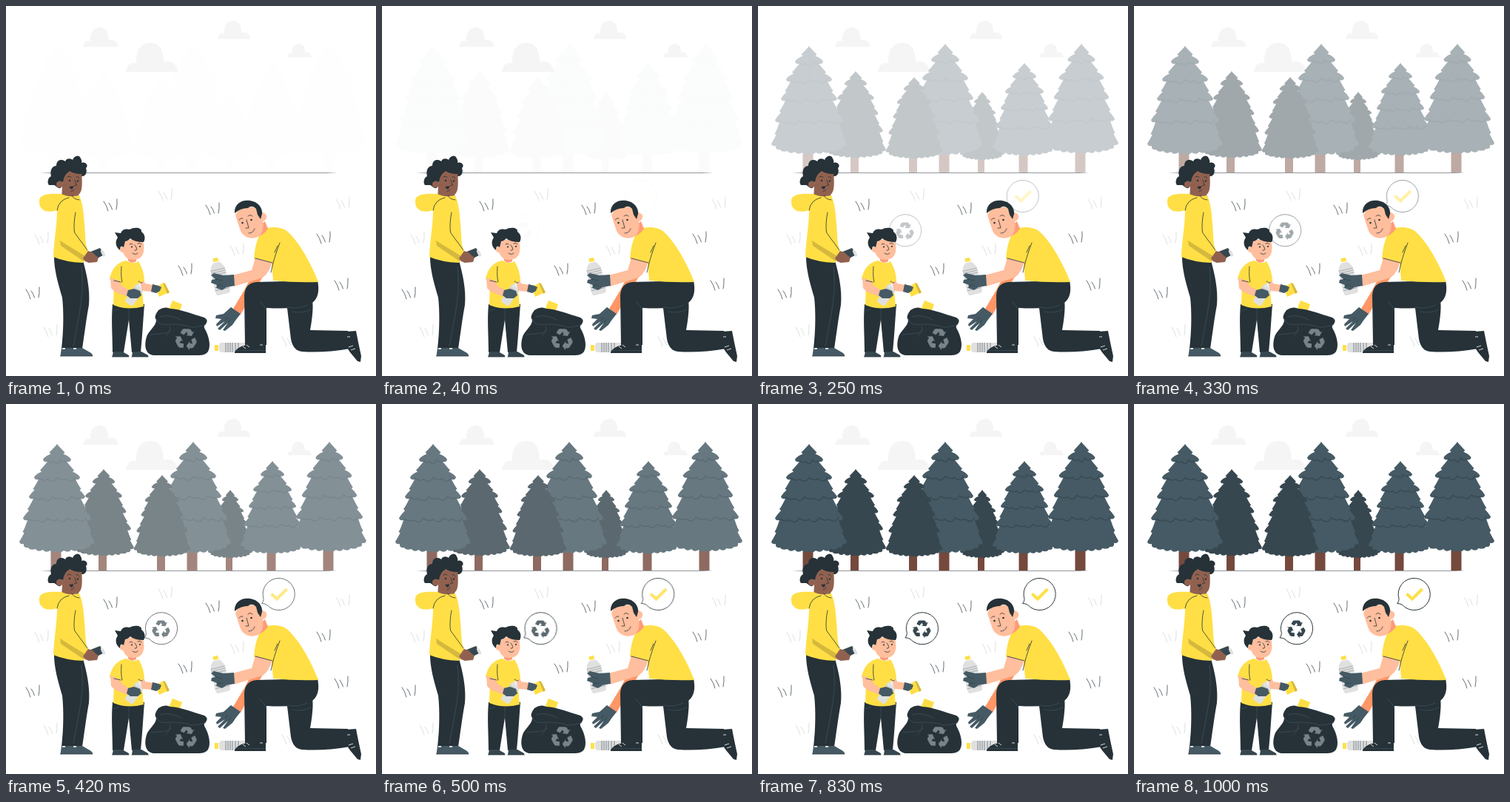
An HTML page for the animation above (1.04 s loop, 500x500 px).

```html
<!DOCTYPE html>
<html lang="en">
<head>
<meta charset="utf-8">
<title>Park clean-up</title>
<style>
  html, body { margin: 0; width: 100%; height: 100%; overflow: hidden; background: #fff; }
  svg { display: block; width: 100vw; height: 100vh; }
  .dark { fill: #263238; }
  .slate { fill: #455a64; }
  .deep { fill: #37474f; }
  .sun { fill: #ffdf45; }
  .skin { fill: #ffbe9d; }
  .brown { fill: #91614f; }
  .pale { fill: #e0e0e0; }
  .line { fill: none; stroke: #263238; stroke-width: .8; stroke-linecap: round; stroke-linejoin: round; }
  .bubble { fill: #fff; stroke: #263238; stroke-width: 1; }
  .seam { fill: none; stroke: #455a64; stroke-width: .6; }
  .fade, .slide { animation: 1040ms infinite; }
  .fade { animation-name: fade; }
  .slide { animation-name: slide; }
  @keyframes fade {
    0% { opacity: .005; animation-timing-function: cubic-bezier(.345, .089, .499, 1.367); }
    92.31%, 100% { opacity: 1; }
  }
  @keyframes slide {
    0% { opacity: .005; transform: translateX(-29.9px); animation-timing-function: cubic-bezier(.345, .089, .499, 1.367); }
    92.31%, 100% { opacity: 1; transform: none; }
  }
</style>
</head>
<body>
<svg viewBox="0 0 500 500">
  <defs>
    <path id="cloud" fill="#f5f5f5" d="M0 39C1 31 5 27 10 27Q12 27 14 28C13 10 20 0 33 0S51 10 51 26C60 22 69 27 70 39Z"/>
    <path id="tuft" class="line" style="stroke-width:.7" d="M-9-5Q-5 0-3 8M-2-3Q1 1 2.500 6M9-8Q9.500 0 8 6"/>
    <path id="bubble" class="bubble" d="M-20.600 6.500A21.600 21.600 0 1 1-16 14.500Q-19.500 12.300-23 12.600Q-20.600 10-20.600 6.500Z"/>
    <path id="arrow" d="M-6.2-6.2L-4.5-9.2Q-3.8-10.4-2.4-10.4H2.5Q3.8-10.4 4.4-9.4L5.5-7.4 7.4-8.5 5.3-3.6-.5-4 1.4-5 0-7.6-2.6-4.2Z"/>
    <g id="recycle">
      <use href="#arrow"/><use href="#arrow" transform="rotate(120)"/><use href="#arrow" transform="rotate(240)"/>
    </g>
  </defs>

  <use href="#cloud" transform="translate(104.5 29) scale(.67)"/>
  <use href="#cloud" transform="translate(162 50)"/>
  <use href="#cloud" transform="translate(286 20) scale(.63)"/>
  <use href="#cloud" transform="translate(380 51) scale(.47)"/>

  <g id="trees" class="fade"></g>
  <path d="M46 225.500L60 225.200H434L448 225.500 434 225.800H60Z" class="dark"/>
  <g id="grass"></g>

  <!-- speech bubbles -->
  <g class="slide">
    <use href="#bubble" x="220" y="303.300"/>
    <use href="#recycle" class="deep" transform="translate(219.500 304.300) scale(1.140)"/>
  </g>
  <g class="slide">
    <use href="#bubble" x="378.700" y="257"/>
    <path d="M368.500 256.500L376 263.500 389.500 250" fill="none" stroke="#ffdf45" stroke-width="4"/>
  </g>

  <!-- woman -->
  <g>
    <path class="dark" d="M58 242C55 238 57 232 61 230C59 223 62 216 68 216C68 208 75 206 80 210C82 205 88 206 90 208C92 202 99 200 101 206Q103 209 102 212C108 210 112 216 108 219C110 224 108 230 103 230L77 236 74 246C69 247 67 242 65 242Z"/>
    <path class="brown" d="M76 245L75 260 99 261 98 255C104 251 103 238 102 222H84L77 228Z"/>
    <circle class="brown" cx="72.500" cy="241" r="4.600"/>
    <path class="dark" d="M69 236Q72 220 84 215H105Q106 228 101 227Q92 227 86 223Q78 228 77 238L75 236Q72 235 69 238Z"/>
    <path class="line" d="M83 231Q86 229 88 231M95 231Q98 230 99 233M93 235Q95 241 95.500 242L92 243M88 251Q91 250 92 248"/>
    <path class="dark" d="M85.500 244L91 243.500Q91 247.500 88 247.500Q86 247 85.500 244Z"/>
    <circle class="dark" cx="86" cy="236" r="1.200"/><circle class="dark" cx="97" cy="236.500" r="1.200"/>
    <path class="dark" d="M65 339L104 344C109 362 114 384 112 404C108 426 106 444 103 463H75C78 438 78 412 76 394C70 374 65 356 65 339Z"/>
    <path class="seam" d="M102 352Q106 384 98 421L91 460"/>
    <path class="slate" d="M75 462H89L101 470V473H73.500ZM90 462H103L115 469Q117.500 471 117 473H97Z"/>
    <path class="line" d="M73.500 473H117"/>
    <path class="pale" d="M76 462H80V464H76ZM91 462H95V464H91Z"/>
    <path class="sun" d="M45 263C45 254 59 253 75 254Q84 259 99 256C106 271 106 300 108 322L111 333 104 347Q80 346 64 339C65 315 69 296 69 276Q62 279 53 277C45 273 45 268 45 263Z"/>
    <path d="M73 317Q91 327 110 337L105 345 74 324Z" fill="#d5b83d"/>
    <path class="sun" d="M75 280Q85 260 94 279L92 305 111 331 107 338 76 319Z"/>
    <path class="line" d="M94 279Q91 294 92.500 306L110 330M99 262Q91 261 89 256M69 276Q71 262 85 259"/>
    <path class="deep" d="M112 333L127 327 133 336 119 343Z"/>
    <ellipse class="pale" cx="131" cy="334" rx="2" ry="5" transform="rotate(-28 131 334)"/>
    <path class="brown" d="M104 341L111 331 117 333 121 337 125 340 123 346 112 347 107 345Z"/>
  </g>

  <!-- child -->
  <g>
    <path class="dark" d="M144 403H187C185 429 184 449 182 468H170L166 424 159 468H144C144 446 142 424 144 403Z"/>
    <path class="seam" d="M166 409V424M153 409Q147 412 145 412"/>
    <path class="deep" d="M145 467H157L166 472V474H143.500ZM171 467H183L192 472V474H170Z"/>
    <path class="line" d="M143.500 474H166M170 474H192.500"/>
    <path class="sun" d="M162 344Q172 350 179 345Q187 358 187 373L183 374 186 406Q164 412 145 404L146 374 140 369Q144 348 162 344Z"/>
    <path fill="#ff9b78" d="M164 336H176V345Q169 349 165 344Z"/>
    <path class="skin" d="M157 326C158 313 183 311 186 321C188 334 184 343 172 343C164 344 159 337 157 330Z"/>
    <circle class="skin" cx="158" cy="329" r="4"/>
    <path class="dark" d="M154 330C148 326 147 318 151 313L147 306 155 307Q158 300 167 302C175 298 184 300 183 305C189 309 188 316 186 319Q173 319 168 314Q164 318 161 318L159 326Q154 322 154 330Z"/>
    <path class="line" d="M167 322Q169 320 171 322M178 321Q181 319 183 322M174 323Q178 328 176 330L174 330M171 334Q175 337 178 334"/>
    <circle class="dark" cx="170" cy="325.500" r="1.100"/><circle class="dark" cx="181" cy="325" r="1.100"/>
    <g transform="rotate(34 174 389)">
      <rect class="pale" x="168" y="376" width="13" height="29" rx="3"/>
      <rect x="171" y="372" width="7" height="5" fill="#eee"/>
      <path d="M168 382H181M168 385H181" stroke="#b5babd" stroke-width=".8"/>
    </g>
    <path class="skin" d="M141 367L154 372 156 378 168 385 165 393C154 389 145 386 142 381Z"/>
    <path class="slate" d="M165 384L173 382 181 385 183 391 178 395 168 395 163 391Z"/>
    <path class="skin" d="M186 371L188 375 199 377 198 386 184 385 182 375Z"/>
    <path class="sun" d="M202 380L213 374 220 387 207 393Z"/>
    <path d="M212 374L215 375 221 387 218 389Z" fill="#d5b83d"/>
    <path class="slate" d="M198 376L206 378 210 380 208 385 203 388 196 386Z"/>
    <path class="line" d="M156 352Q155 366 157 373M155 373L146 371M179 372Q182 375 184 374"/>
  </g>

  <!-- bag -->
  <path class="sun" d="M225 398L238 403 234 414 220 410Z"/>
  <path class="dark" d="M206 411Q214 405 222 409C237 410 251 416 268 421Q274 424 270 430Q267 432 268 435C275 447 277 460 273 467Q270 472 260 472H199C187 470 187 457 190 447C193 438 203 433 203 424Q199 420 206 411Z"/>
  <path class="seam" d="M203 423Q207 433 221 430Q241 430 251 434Q263 434 270 430M221 432Q224 440 216 442L195 444M208 420Q221 416 236 424M223 438L215 447"/>
  <use href="#recycle" fill="#77838a" transform="translate(243.500 450.500) rotate(3) scale(1.360)"/>

  <!-- bottle on the ground -->
  <rect class="pale" x="288" y="455" width="43" height="13" rx="4"/>
  <path class="sun" d="M282 458H287V466H282Z"/>
  <path d="M297 455V468M300 455V468M303 455V468M306 455V468M310 455V468M314 455V468" stroke="#7f898e" stroke-width="1"/>

  <!-- man -->
  <g>
    <path fill="#ff9666" d="M334 361L347 366 330 394 317 417 307 409 322 384Z"/>
    <path class="slate" d="M304 407L317 416 310 425 306 431 296 439 293 438 300 428 289 438 286 436 296 426 285 433 284 430 291 423 283 422 284 418 294 416Z"/>
    <path class="line" d="M300 428L303 424M296 426L299 421" style="stroke-width:.5"/>
    <path class="dark" d="M379 400L414 398Q416 410 411 438L462 439 465 463Q430 469 400 467Q388 466 385 450Z"/>
    <path class="dark" d="M421 371C424 386 422 399 408 404Q391 410 352 408V458H323L322 391Q323 374 339 373Z"/>
    <path class="seam" d="M408 404Q394 410 380 407M412 410Q401 416 386 413M342 399Q350 404 352 413"/>
    <path class="dark" d="M459 440L473 439Q476 455 480 473L479 481 475 480 465 468 461 462Z"/>
    <path d="M463 461L469 459M466 465L472 463M461 447H465" stroke="#fff" stroke-width=".8"/>
    <path class="dark" d="M309 468Q310 464 318 460L328 457H351V469H309Z"/>
    <path class="seam" d="M310 465.500H351"/>
    <path d="M320 460L324 463M325 458L329 461M343 458H347" stroke="#fff" stroke-width=".8"/>
    <path class="sun" d="M348 301Q366 296 378 303C393 314 412 346 422 373Q390 374 361 371L359 347 335 342Q337 314 348 301Z"/>
    <path fill="#ff9b78" d="M333 305L350 291 354 301Q347 311 335 313Z"/>
    <path class="skin" d="M310 283C314 270 332 267 343 277L349 280C354 281 353 290 347 291Q349 302 344 309C335 318 321 313 317 304Z"/>
    <path class="dark" d="M309 280C308 268 318 261 330 263C342 265 347 274 346 281L344 288 340 282 338 274Q332 268 327 273Q317 273 309 280Z"/>
    <path class="line" d="M315 289Q317 286 320 287M327 284Q330 281 333 284M325 289Q327 296 328 300L324 300M328 307Q334 307 336 301"/>
    <circle class="dark" cx="319.500" cy="293" r="1.300"/><circle class="dark" cx="331.500" cy="289" r="1.300"/>
    <g transform="translate(-1.500 0) rotate(-13 290 366)">
      <path class="pale" d="M286 346H294Q300 351 300 358V386Q300 390 296 390H284Q280 390 280 386V358Q280 351 286 346Z"/>
      <rect class="sun" x="286.500" y="340" width="7" height="5" rx="1"/>
      <path d="M280 356H300M280 359H300M280 362H300M280 379H300M280 383H300" stroke="#9ca4a8" stroke-width=".8"/>
    </g>
    <path class="skin" d="M337 340L359 347Q357 359 347 367L308 379 306 364 332 357Z"/>
    <path class="slate" d="M308 363L309 378 298 380 292 384 284 381 285 377 277 374 278 370 283 369 277 364 281 361 294 364Z"/>
    <path class="line" style="stroke-width:.5" d="M285 377L293 378M283 369L292 371"/>
    <path class="line" d="M370 320Q364 336 361 347L358 360M360 347L337 341M363 333L367 324"/>
  </g>
</svg>
<script>
const put = (id, html) => { document.getElementById(id).innerHTML = html; };
const tiers = [[19, 21], [31, 45], [38, 71], [46, 100], [51, 132]];

// Left half of a crown; the right half mirrors it.
const half = (() => {
  let d = 'M.5 0', px = 0, py = 0;
  for (const [x, y] of tiers) {
    const mx = (px + x) / 2, my = (py + y) / 2;
    d += `Q${-mx + 1} ${my - 1} ${-mx - 1} ${my + 1}l2 2Q${-x + 3} ${y - 5} ${-x} ${y}q1 4 6 3`;
    px = x - 6;
    py = y + 3;
  }
  return d + 'q-1 6 6 5q2 4 10 2q3 5 10 1q3 5 10 1q4 4 9.500 1V0Z';
})();

const fringe = ([x, y], i) => {
  const n = i + 3, step = (x * 2 - 12) / n;
  let d = `M${6 - x} ${y + 1}`;
  for (let k = 0; k < n; k++) d += `q${step * .6} ${k % 2 ? 7 : 5} ${step} ${k % 2 ? -2 : 1.500}`;
  return d;
};
const folds = tiers.slice(0, 4).map(fringe).join('');

// x, top, half width, height, trunk half width, shaded
const trees = [
  [132, 88, 41, 117, 5.500, 1], [303, 116, 30, 92, 4.500, 1], [69, 54, 51, 146, 7, 0],
  [253, 51, 51, 150, 7, 0], [211, 96, 38.500, 110, 5.500, 1], [360, 77, 43, 125, 6, 0], [437, 51, 50, 148, 7, 0]
];
put('trees', trees.map(([x, top, w, h, t, shaded]) => `
  <rect x="${x - t - 1.500}" y="${top + h - 12}" width="${t * 2}" height="${237 - top - h}" fill="#75493d"/>
  <g transform="translate(${x} ${top}) scale(${w / 51} ${h / 146})" fill="${shaded ? '#37474f' : '#455a64'}">
    <path d="${half}"/><path d="${half}" transform="scale(-1 1)"/>
    ${shaded ? '' : `<path d="${folds}" fill="none" stroke="#394b54" stroke-width="1.600"/>`}
  </g>`).join(''));

const tufts = (list, opacity) => list.map(([x, y]) =>
  `<use href="#tuft" x="${x}" y="${y}" opacity="${opacity}"/>`).join('');
put('grass',
  tufts([[141, 269], [279, 274], [429, 313], [242, 356], [453, 376], [36, 388]], 1) +
  tufts([[48, 314], [215, 255], [455, 266], [312, 329], [60, 439], [382, 452]], .22));
</script>
</body>
</html>
```
